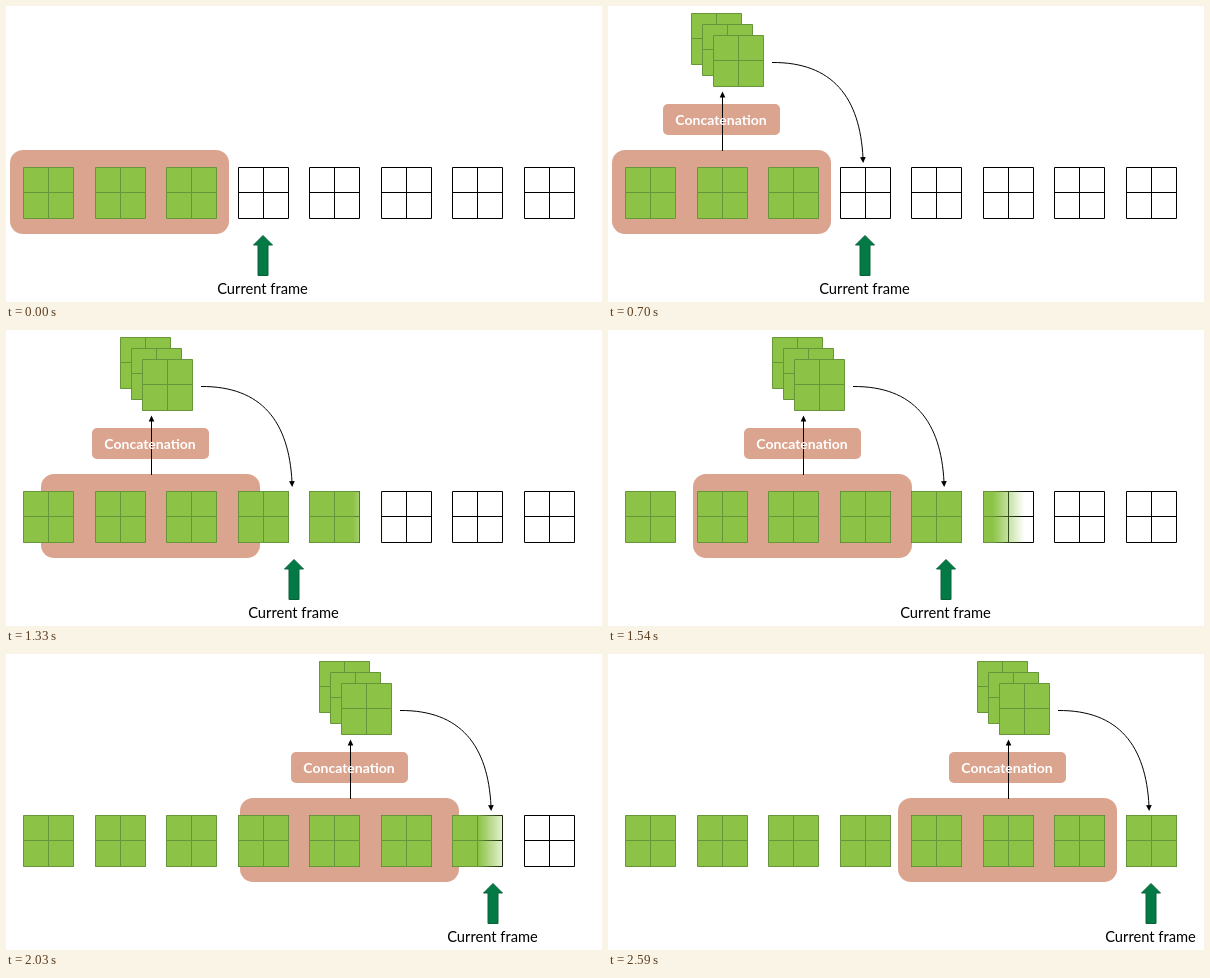
Recreate the animation shown at these times as an HTML page. Size 596x296 px, loop 2.66 s.

```html
<!DOCTYPE html>
<html lang="en">
<head>
<meta charset="utf-8">
<title>Sliding window</title>
<style>
  html, body { margin: 0; width: 100%; height: 100%; overflow: hidden; background: #fff; }
  svg { display: block; }
  text { font: 14.7px Lato, "Open Sans", sans-serif; text-anchor: middle; }
  .empty { fill: #fff; stroke: #000; }
  .full { fill: #8cc346; stroke: #67963a; }
  .tan { fill: #dba48e; }
  .line { fill: none; stroke: #000; }
</style>
</head>
<body>
<svg width="596" height="296" viewBox="0 0 596 296">
  <defs id="defs"></defs>
  <g class="moving"><rect class="tan" x="4" y="144" width="219" height="84" rx="13"/></g>
  <g id="empty"></g>
  <g id="known"></g>
  <g id="next" mask="url(#nextMask)"></g>
  <g id="later" mask="url(#laterMask)"></g>
  <g class="moving">
    <g mask="url(#labelMask)">
      <rect class="tan" x="55" y="98" width="117" height="31" rx="5"/>
      <path class="line" d="M114.5 145V90"/>
      <path d="M114.5 85.5l2.8 6h-5.6z"/>
      <text x="113" y="119" fill="#fff" style="font-size:14px;font-weight:bold">Concatenation</text>
    </g>
    <g id="stack" mask="url(#stackMask)"></g>
    <g mask="url(#arcMask)">
      <path class="line" d="M164 56.5C225 56 252 92 255 152"/>
      <path d="M255.2 157l-3.2-5.8 5.7-.3z"/>
    </g>
    <path d="M257 229.5l9.5 9.5h-4.5v30.5h-10v-30.5h-4.5z" fill="#037a45" stroke="#0a6239"/>
    <text x="256.5" y="288">Current frame</text>
  </g>
</svg>
<script>
const LOOP = 2660, STEP = 70;
const INTRO = 84, REVEAL = 206;          // four short reveals in a row
const SLIDE = INTRO + 4 * REVEAL, SLIDE_TIME = 1660, DISTANCE = 286;
const FEATHER = 0.12;

const byId = id => document.getElementById(id);
const clamp = v => Math.min(1, Math.max(0, v));
const smoother = s => s * s * s * (10 + s * (6 * s - 15));

const tile = (x, y, kind) =>
  `<path class="${kind}" d="M${x} ${y}h50v51h-50zm25 0v51m-25-26h50"/>`;
const cell = (i, kind) => tile(Math.floor(17.5 + 71.5 * i) + 0.5, 161.5, kind);
const cells = (from, to, kind) => {
  let out = '';
  for (let i = from; i < to; i++) out += cell(i, kind);
  return out;
};

byId('empty').innerHTML = cells(3, 8, 'empty');
byId('known').innerHTML = cells(0, 3, 'full');
byId('next').innerHTML = cells(3, 4, 'full');
byId('later').innerHTML = cells(4, 8, 'full');
byId('stack').innerHTML = [0, 1, 2].map(i => tile(83.5 + 11 * i, 7.5 + 11 * i, 'full')).join('');

// Soft-edged wipes running along one axis from `from` to `to`
const wipes = [
  { name: 'label', axis: 'y', from: 146, to: 85, start: INTRO, time: REVEAL },
  { name: 'stack', axis: 'y', from: 81, to: 7, start: INTRO + REVEAL, time: REVEAL },
  { name: 'arc', axis: 'x', from: 163, to: 259, start: INTRO + 2 * REVEAL, time: REVEAL },
  { name: 'next', axis: 'x', from: 231, to: 283, start: INTRO + 3 * REVEAL, time: REVEAL },
  { name: 'later', axis: 'x', from: 303, to: 569, start: SLIDE, time: SLIDE_TIME }
];

byId('defs').innerHTML = wipes.map(({ name }) => `
  <linearGradient id="${name}Edge" gradientUnits="userSpaceOnUse" x1="0" y1="0" x2="0" y2="0">
    <stop offset="0" stop-color="#fff"/><stop offset="1" stop-color="#000"/>
  </linearGradient>
  <mask id="${name}Mask" maskUnits="userSpaceOnUse" x="0" y="0" width="596" height="296">
    <rect width="596" height="296" fill="url(#${name}Edge)"/>
  </mask>`).join('');

function setWipe({ name, axis, from, to, start, time }, t) {
  const length = to - from;
  const tail = from + length * (1 + FEATHER) * clamp((t - start) / time);
  const edge = byId(name + 'Edge');
  edge.setAttribute(axis + 1, tail - length * FEATHER);
  edge.setAttribute(axis + 2, tail);
}

const moving = document.querySelectorAll('.moving');

function draw(now) {
  const t = Math.floor((now % LOOP) / STEP) * STEP;
  const shift = Math.round(DISTANCE * smoother(clamp((t - SLIDE) / SLIDE_TIME)));
  moving.forEach(g => g.setAttribute('transform', `translate(${shift} 0)`));
  wipes.forEach(w => setWipe(w, t));
}

const begin = performance.now();
function tick() {
  draw(performance.now() - begin);
  requestAnimationFrame(tick);
}
tick();
</script>
</body>
</html>
```
